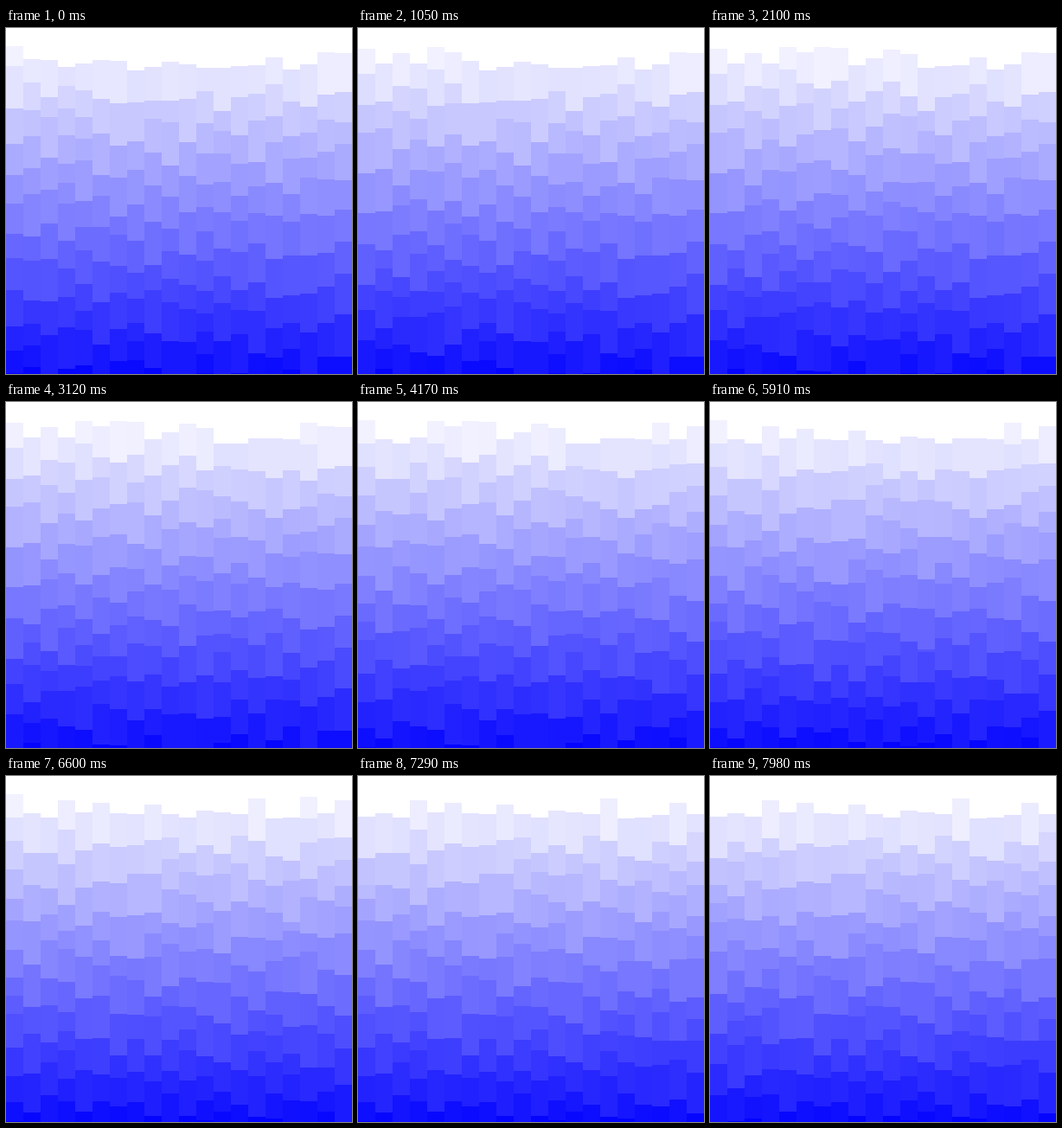
Recreate the animation shown at these times as an HTML page with a canvas. Size 400 by 400 pixels, loop 8 s.

```html
<!DOCTYPE html>
<html lang="en">
<head>
<meta charset="utf-8">
<title>Blue columns</title>
<style>
html, body { margin: 0; width: 100%; height: 100%; overflow: hidden; background: #fff; }
canvas { display: block; width: 100vw; height: 100vh; }
</style>
</head>
<body>
<canvas id="stage" width="400" height="400"></canvas>
<script>
const SIZE = 400, COLS = 20, W = SIZE / COLS;
const LOOP = 8000, TICK = 30, COLUMN_TIME = 181;
const MIN_GAP = 21, MAX_GAP = 50;
const ctx = document.getElementById('stage').getContext('2d');

function makeRandom(seed) {
  return () => {
    seed = (seed + 0x6D2B79F5) | 0;
    let r = Math.imul(seed ^ (seed >>> 15), 1 | seed);
    r = (r + Math.imul(r ^ (r >>> 7), 61 | r)) ^ r;
    return ((r ^ (r >>> 14)) >>> 0) / 4294967296;
  };
}

const random = makeRandom(7);

// Edges of stacked blocks of random height, from 0 past the bottom.
function makeColumn() {
  const edges = [0];
  let y = 0;
  while (y < SIZE) {
    y += Math.round(MIN_GAP + random() * (MAX_GAP - MIN_GAP));
    edges.push(y);
  }
  return edges;
}

// One standing row of columns, then every column the sweep paints over it.
const columns = Array.from({ length: COLS + Math.ceil(LOOP / COLUMN_TIME) }, makeColumn);

// The colour follows the upper edge: white at the top, pure blue at the bottom.
function drawColumn(edges, x, done) {
  const shown = Math.floor(Math.min(1, done) * (edges.length - 1));
  for (let i = 0; i < shown; i++) {
    const y = edges[i], v = Math.round(255 * (1 - y / SIZE));
    ctx.fillStyle = `rgb(${v},${v},255)`;
    ctx.fillRect(x, y, W, edges[i + 1] - y);
  }
}

function draw(t) {
  const swept = COLS + Math.floor(t / TICK) * TICK / COLUMN_TIME;
  columns.forEach((edges, i) => {
    const done = i < COLS ? 1 : swept - i;
    if (done > 0) drawColumn(edges, (i % COLS) * W, done);
  });
}

const start = performance.now();
function frame() {
  draw((performance.now() - start) % LOOP);
  requestAnimationFrame(frame);
}
frame();
</script>
</body>
</html>
```
